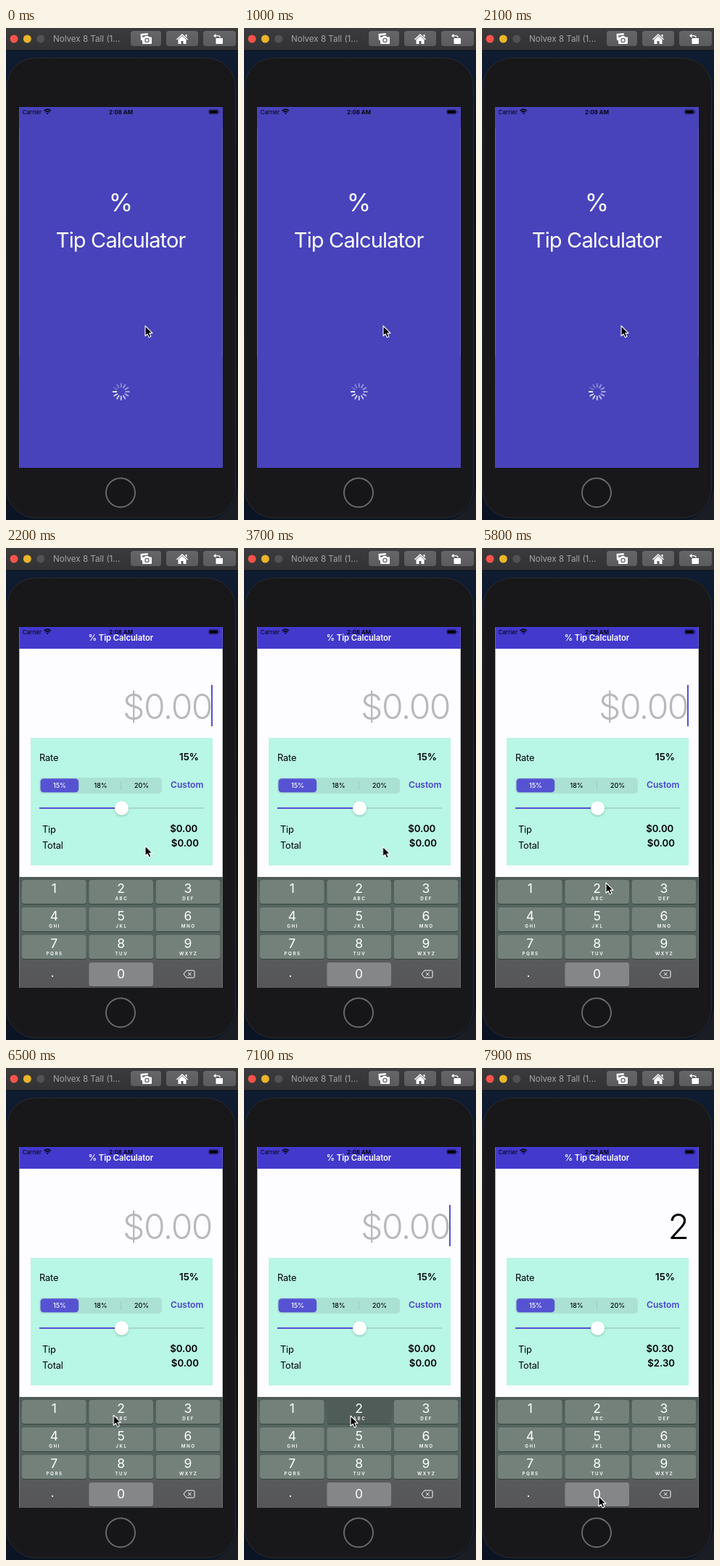
An HTML page for the animation above (8000 ms loop, 320 by 679 pixels).

```html
<!DOCTYPE html>
<html lang="en">
<head>
<meta charset="utf-8">
<title>Tip Calculator</title>
<style>
html, body { margin: 0; width: 100%; height: 100%; overflow: hidden; background: #0b0f18; }
svg { display: block; width: 320px; height: 679px; }
text { font-family: Inter, Roboto, sans-serif; white-space: pre; }
.mid { text-anchor: middle; }
.bold { font-weight: 600; }
.label { font-size: 12.8px; letter-spacing: -.15px; }
.value { font-size: 13.2px; font-weight: 600; text-anchor: end; }
.seg { font-size: 8.9px; font-weight: 500; text-anchor: middle; }
.amount { font-size: 48px; font-weight: 300; letter-spacing: -1.5px; text-anchor: end; }
.digit { font-size: 17.5px; text-anchor: middle; fill: #fff; }
.letters { font-size: 6.2px; font-weight: 600; letter-spacing: 1.6px; text-anchor: middle; fill: #fff; }

/* 8 s timeline: 27.4% launch ends, 90% the 2 is typed */
#splash, #navtitle, .before, .after, #pressed { animation: 8s step-end infinite; }
#splash { animation-name: launch; }
#navtitle { animation-name: arrive; }
.before { animation-name: before; }
.after { animation-name: after; }
#pressed { animation-name: press; }
#pointer { animation: point 8s ease-in-out infinite; }
@keyframes launch { 0% { opacity: 1 } 27.4%, 100% { opacity: 0 } }
@keyframes arrive { 0% { opacity: 0 } 27.4%, 100% { opacity: 1 } }
@keyframes before { 0% { opacity: 1 } 90%, 100% { opacity: 0 } }
@keyframes after { 0% { opacity: 0 } 90%, 100% { opacity: 1 } }
@keyframes press { 0% { opacity: 0 } 87.4% { opacity: 1 } 90%, 100% { opacity: 0 } }
@keyframes point {
  0%, 28% { transform: translate(192px, 411px) }
  46%, 48% { transform: translate(191.4px, 412px) }
  60%, 72.5% { transform: translate(171px, 462px) }
  83%, 91% { transform: translate(147px, 480px) }
  98%, 100% { transform: translate(161px, 591px) }
}
</style>
</head>
<body>
<svg viewBox="0 0 320 679">
  <defs>
    <linearGradient id="wall" x2="0" y2="1">
      <stop offset="0" stop-color="#101f36"/>
      <stop offset=".1" stop-color="#0e1a2d"/>
      <stop offset=".3" stop-color="#0a0e16"/>
      <stop offset=".7" stop-color="#10131a"/>
      <stop offset="1" stop-color="#0b1424"/>
    </linearGradient>
    <linearGradient id="bar" x2="0" y2="1">
      <stop offset="0" stop-color="#3b3b3d"/>
      <stop offset="1" stop-color="#323234"/>
    </linearGradient>
    <linearGradient id="button" x2="0" y2="1">
      <stop offset="0" stop-color="#666668"/>
      <stop offset="1" stop-color="#5b5b5d"/>
    </linearGradient>
    <linearGradient id="board" x2="0" y2="1">
      <stop offset="0" stop-color="#4c5854"/>
      <stop offset=".25" stop-color="#54655f"/>
      <stop offset=".62" stop-color="#55625e"/>
      <stop offset=".8" stop-color="#58595a"/>
      <stop offset="1" stop-color="#565658"/>
    </linearGradient>
    <filter id="soft" x="-50%" y="-50%" width="200%" height="200%">
      <feDropShadow dx="0" dy="1.5" stdDeviation="1.8" flood-opacity=".22"/>
    </filter>
  </defs>

  <rect width="320" height="679" fill="url(#wall)"/>
  <path d="M284 679Q316 668 320 632V679Z" fill="#1a1d24"/>

  <g id="titlebar">
    <rect width="320" height="31" fill="url(#bar)"/>
    <rect y="30.5" width="320" height="1" fill="#0c0d10"/>
    <circle cx="11" cy="15" r="5.5" fill="#f9534a"/>
    <circle cx="29.3" cy="15" r="5.5" fill="#eab52c"/>
    <circle cx="47.7" cy="15" r="5.5" fill="#525254"/>
    <text x="65" y="19" font-size="11.6" fill="#a5a5a7">Nolvex 8 Tall (1...</text>
    <g fill="url(#button)">
      <rect x="172" y="4" width="42" height="21" rx="4"/>
      <rect x="221" y="4" width="44" height="21" rx="4"/>
      <rect x="272" y="4" width="45" height="21" rx="4"/>
    </g>
    <g fill="#fff">
      <path d="M185.500 8l10-1 .5 2.500-8 1v6.500h-2z"/>
      <path d="M189 12.5h2l1.200-1.500h4l1.200 1.500h2.600q1 0 1 1v7.500q0 1-1 1h-11q-1 0-1-1v-7.500q0-1 1-1z"/>
      <circle cx="194.5" cy="17" r="2.6" fill="none" stroke="#606062" stroke-width="1.2"/>
      <path d="M235 15.500L243 8l8 7.500-1 1-7-6.500-7 6.500z"/>
      <path d="M247.500 9h2v4l-2-2zM237.500 16l5.500-5 5.500 5v6h-4v-4h-3v4h-4z"/>
      <rect x="289.500" y="14" width="9.500" height="8" rx="1"/>
      <path d="M289.500 8v5.500l-3.500-2.700z"/>
      <path d="M289 10.700h3q3 0 3.200 2.500" fill="none" stroke="#fff" stroke-width="1.300"/>
    </g>
  </g>

  <g id="phone">
    <rect x="1" y="41.500" width="315.500" height="634.500" rx="40" fill="#18171a" stroke="#2a2c30"/>
    <circle cx="158" cy="641.300" r="20" fill="#161518" stroke="#6b6b6d" stroke-width="1.900"/>
  </g>

  <g id="app">
    <rect x="18.300" y="109" width="280.500" height="498" fill="#fdfcff"/>
    <rect x="18.300" y="109" width="280.500" height="30" fill="#4339cc"/>

    <text class="amount before" x="284" y="236" fill="#b8b8bb">$0.00</text>
    <text class="amount after" x="284.500" y="236">2</text>
    <rect id="caret" x="283" y="189" width="2" height="57" fill="#5453c0"/>

    <rect x="34" y="262" width="251" height="176" fill="#b8f6e5"/>
    <text class="label" x="46" y="294">Rate</text>
    <text class="value" x="266" y="293">15%</text>

    <rect x="46" y="317" width="169" height="22" rx="5" fill="#abe1d4"/>
    <rect x="47.500" y="318.300" width="52.700" height="19" rx="4.500" fill="#5653d2"/>
    <path d="M158.500 322V334" stroke="#94c8bc" stroke-width=".8"/>
    <text class="seg" x="74" y="331" fill="#fff">15%</text>
    <text class="seg" x="130.500" y="331">18%</text>
    <text class="seg" x="187" y="331">20%</text>
    <text class="bold" x="227" y="331" font-size="12.1" fill="#4a40cc">Custom</text>

    <path d="M46 359H273" stroke="#a4dacd" stroke-width="2"/>
    <path d="M46 359H159" stroke="#5450cf" stroke-width="2"/>
    <circle cx="159.500" cy="359" r="9.500" fill="#fff" filter="url(#soft)"/>

    <text class="label" x="50" y="393">Tip</text>
    <text class="label" x="50" y="415">Total</text>
    <g class="before">
      <text class="value" x="264.300" y="392">$0.00</text>
      <text class="value" x="266" y="412">$0.00</text>
    </g>
    <g class="after">
      <text class="value" x="264.300" y="392">$0.30</text>
      <text class="value" x="266" y="412">$2.30</text>
    </g>

    <rect x="18.300" y="454" width="280.500" height="153" fill="url(#board)"/>
    <g id="keys"></g>
    <path d="M249 583h9.500q1.500 0 1.500 1.500v7q0 1.500-1.500 1.500h-9.500l-4-5zM251 585.700l4.600 4.600M255.600 585.700l-4.600 4.600"
          fill="none" stroke="#fff" stroke-width="1"/>
  </g>

  <g id="splash">
    <rect x="18.300" y="109" width="280.500" height="498" fill="#4843bb"/>
    <text class="mid" x="158.500" y="253" font-size="34" fill="#fff">%</text>
    <text class="mid" x="158.200" y="303" font-size="29" letter-spacing="-.85" fill="#fff">Tip Calculator</text>
    <g id="spinner" stroke="#fff" stroke-width="2" stroke-linecap="round"></g>
  </g>

  <g id="status">
    <text x="22.500" y="118.500" font-size="8.100">Carrier</text>
    <path d="M52.500 114.200q4.700-4 9.400 0M54.300 116.200q2.900-2.400 5.800 0" fill="none" stroke="#000" stroke-width="1.500"/>
    <path d="M55.700 117.500q1.500-1.200 3 0l-1.500 1.700z"/>
    <text class="mid bold" x="158.500" y="118.500" font-size="8">2:08 AM</text>
    <rect x="279.500" y="112.500" width="13.500" height="6.500" rx="1.800" fill="none" stroke="#000" stroke-opacity=".5" stroke-width=".7"/>
    <rect x="280.500" y="113.400" width="11.500" height="4.700" rx="1"/>
    <rect x="293.800" y="114.800" width="1" height="2" rx=".5" fill-opacity=".6"/>
  </g>
  <text id="navtitle" class="mid bold" x="158.500" y="128" font-size="11.200" fill="#fff">% Tip Calculator</text>

  <path id="pointer" d="M0 0V14L3.200 11.100 5.300 15.900 7.900 14.800 5.800 10.100H10Z"
        fill="#000" stroke="#fff" stroke-width="1.100" stroke-linejoin="round"/>
</svg>

<script>
const LOOP = 8000, LAUNCH = 2192, TYPED = 7200;

const byId = id => document.getElementById(id);
const add = (parent, tag, attrs, text = "") => {
  const el = document.createElementNS("http://www.w3.org/2000/svg", tag);
  for (const name in attrs) el.setAttribute(name, attrs[name]);
  el.textContent = text;
  return parent.appendChild(el);
};

// Number pad
const keys = byId("keys");
const letters = ["", "ABC", "DEF", "GHI", "JKL", "MNO", "PQRS", "TUV", "WXYZ"];
const keyBox = (col, row, fill, dy = 0) => add(keys, "rect", {
  x: 22 + col * 92.3, y: 458 + row * 38 + dy, width: 88.7, height: 33, rx: 3.5, fill
});
const key = (col, row, fill) => {
  keyBox(col, row, "#38423f", 1);
  keyBox(col, row, fill);
};
letters.forEach((name, i) => {
  const col = i % 3, row = Math.floor(i / 3);
  const x = 66.3 + col * 92.3, y = 476 + row * 38;
  key(col, row, "#74817b");
  if (name === "ABC") keyBox(col, row, "#505c57").id = "pressed";
  add(keys, "text", { class: "digit", x, y }, i + 1);
  add(keys, "text", { class: "letters", x: x + .8, y: y + 10 }, name);
});
key(1, 3, "#858687");
add(keys, "text", { class: "digit", x: 158.5, y: 594 }, "0");
add(keys, "text", { class: "digit", x: 64, y: 592 }, ".");

// Activity indicator, brightest spoke pointing left
for (let a = 0; a < 360; a += 30) {
  const fade = ((270 - a + 360) % 360) / 360;
  add(byId("spinner"), "path", {
    d: "M0-6.500V-11",
    transform: `translate(158.800 502) rotate(${a})`,
    opacity: .88 - .7 * fade
  });
}

// Caret blinks every 900 ms and restarts solid when a digit is typed
const blink = [];
const blinks = (from, to) => {
  for (let t = from; t < to; t += 900)
    for (const [dt, opacity] of [[0, 1], [480, 1], [580, 0], [810, 0]])
      if (t + dt < to) blink.push({ opacity, offset: (t + dt) / LOOP });
};
blinks(LAUNCH, TYPED);
blinks(TYPED, LOOP);
byId("caret").animate(
  [{ opacity: 1, offset: 0 }, ...blink, { opacity: 0, offset: 1 }],
  { duration: LOOP, iterations: Infinity }
);
</script>
</body>
</html>
```
